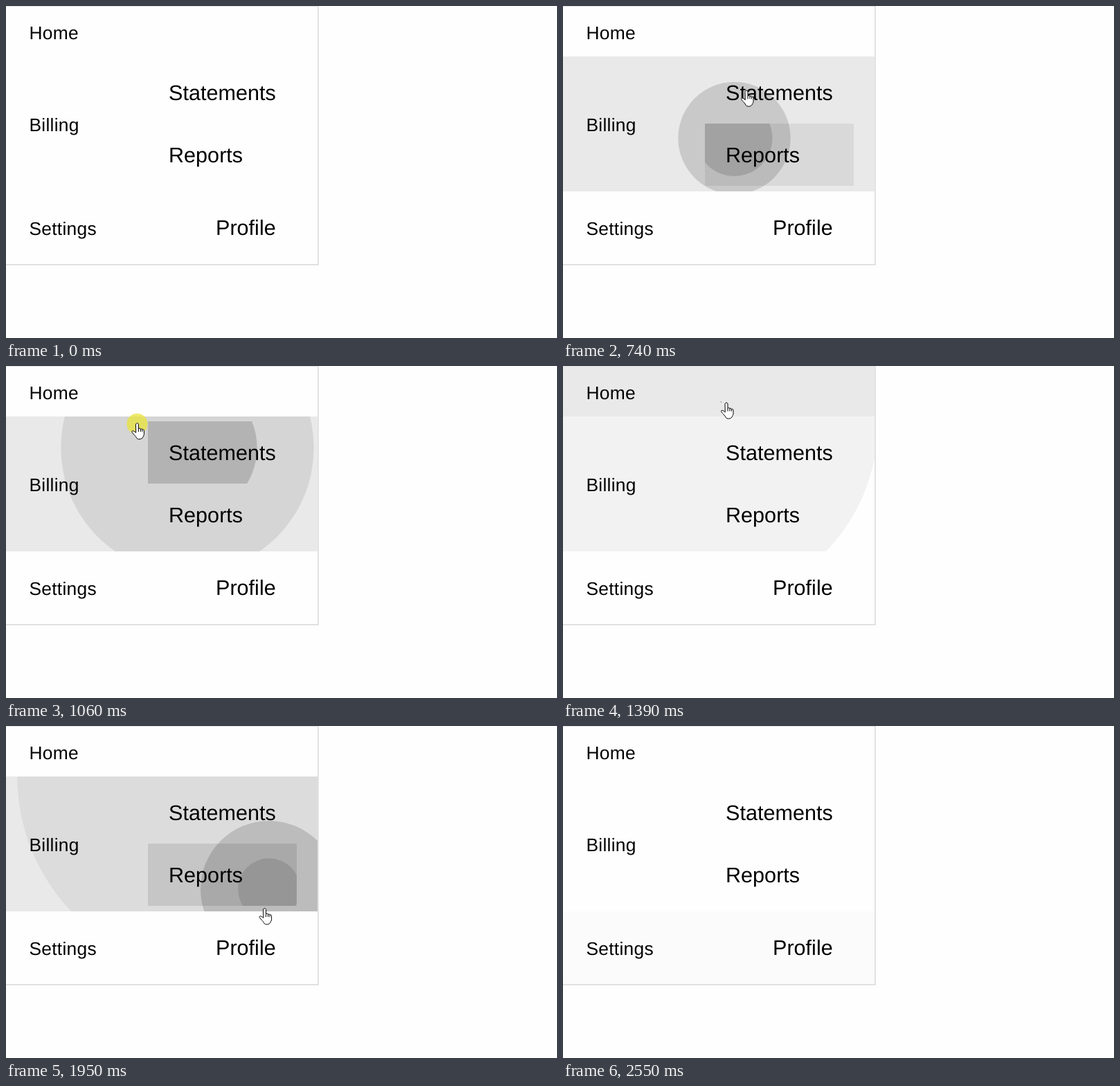
An HTML page for the animation above (3.97 s loop, 796 px wide and 480 px high).

```html
<!DOCTYPE html>
<html lang="en">
<head>
<meta charset="utf-8">
<title>Menu ripples</title>
<style>
  html, body { margin: 0; width: 100%; height: 100%; overflow: hidden; background: #fefefe; }
  svg { display: block; width: 796px; height: 480px; }
  text { font-family: "Liberation Sans", Arial, sans-serif; text-rendering: geometricPrecision; }
  .item { font-size: 26.4px; letter-spacing: .25px; }
  .button { font-size: 30.6px; }
  .line { fill: #e2e2e2; }
  #hand path { fill: #fff; stroke: #000; stroke-linejoin: round; stroke-linecap: round; }
</style>
</head>
<body>
<svg viewBox="0 0 796 480">
  <defs id="defs"></defs>
  <g class="line">
    <rect width="452" height="1"/>
    <rect x="450" width="2" height="375"/>
    <rect y="373" width="452" height="2"/>
  </g>
  <g id="areas"></g>
  <g class="item">
    <text x="33.5" y="48">Home</text>
    <text x="33.5" y="181">Billing</text>
    <text x="33.5" y="331">Settings</text>
  </g>
  <g class="button">
    <text x="235" y="136">Statements</text>
    <text x="235" y="226">Reports</text>
    <text x="303" y="331">Profile</text>
  </g>
  <g id="hand">
    <circle id="press" cy="1" r="15" fill="#e8e337" fill-opacity=".75"/>
    <path d="M-2 2C-2 -.7 2 -.7 2 2V8.5C2.5 7 5 7 5 9C5.5 7.6 7.5 8 7.5 9.8C8 8.6 10 9 10 11V16C10 18 8.5 19 8.5 20C7 24 0 24 -1 21C-1.5 19 -7.5 14 -7.5 12.5C-7.5 10.5 -5 10.5 -2 13.5Z"/>
    <path d="M2 9v3M5 9v3M7.5 10v2"/>
  </g>
</svg>
<script>
const LOOP = 3970, GROW = 385, HOVER = 120, PRESS = 60, STEP = 48;
const $ = id => document.getElementById(id);
const clamp = v => Math.min(1, Math.max(0, v));
const smooth = v => v * v * (3 - 2 * v);

function add(parent, tag, attrs) {
  const el = document.createElementNS("http://www.w3.org/2000/svg", tag);
  for (const k in attrs) el.setAttribute(k, attrs[k]);
  return parent.appendChild(el);
}

// Darkness of hover and of a ripple that has grown to fraction f
const row = { hover: .084, ripple: f => .187 * (1 - .9 * f) };
const button = { hover: .1, ripple: f => .168 * Math.sin(Math.PI * f) };

// box: left, top, right, bottom; spans: pointer enters, leaves
const areas = {
  home: { ...row, box: [0, 1, 450, 73], spans: [[1180, 1600]] },
  billing: { ...row, box: [0, 73, 450, 268], spans: [[150, 1130], [1600, 2070]] },
  settings: { ...row, box: [0, 268, 450, 373], spans: [[2060, 2445]] },
  statements: { ...button, box: [205, 80, 420, 170], spans: [[760, 930], [1585, 1705]] },
  reports: { ...button, box: [205, 170, 420, 260], spans: [[200, 705], [1750, 2050]] },
  profile: { ...button, box: [273, 275, 420, 365], spans: [[2060, 2240]] }
};

const clicks = [
  { time: 626, x: 247.5, y: 191, hits: ["billing", "reports"] },
  { time: 827, x: 262, y: 118, hits: ["billing", "statements"] },
  { time: 1070, x: 189, y: 83, hits: ["billing"] },
  { time: 1388, x: 228.5, y: 52, hits: ["home"] },
  { time: 1636, x: 299.5, y: 73, hits: ["billing"] },
  { time: 1849, x: 380, y: 236, hits: ["billing", "reports"] },
  { time: 2120, x: 365, y: 301, hits: ["settings", "profile"] }
];

// The pointer visits every click, with a few stops between
const route = [
  ...clicks.map(c => [c.time - PRESS / 2, c.x, c.y]),
  [130, 262, 328], [320, 247, 200], [490, 247, 200], [740, 265, 122],
  [1390, 236, 53], [1750, 367, 227], [2180, 427, 332], [2550, 547, 484]
].sort((a, b) => a[0] - b[0]);

// Times the screen refreshes are evenly spread between
const beats = [130, 490, 740, 1060, 1390, 1750, 2180, 2550];

for (const name in areas) {
  const a = areas[name], [l, t, r, b] = a.box;
  const rect = { x: l, y: t, width: r - l, height: b - t };
  add(add($("defs"), "clipPath", { id: name }), "rect", rect);
  a.fill = add($("areas"), "rect", rect);
  a.layer = add($("areas"), "g", { "clip-path": `url(#${name})` });
}

const ripples = clicks.flatMap(({ time, x, y, hits }) => hits.map(name => {
  const { box: [l, t, r, b], layer, ripple } = areas[name];
  const reach = Math.hypot(Math.max(x - l, r - x), Math.max(y - t, b - y));
  return { time, reach, ripple, el: add(layer, "circle", { cx: x, cy: y }) };
}));

function snap(t) {
  const i = beats.findIndex(b => t < b);
  if (i === 0) return t;
  if (i < 0) return beats[beats.length - 1];
  const a = beats[i - 1], gap = beats[i] - a;
  const step = gap / Math.round(gap / STEP);
  return a + Math.floor((t - a) / step + 1e-6) * step;
}

function pointer(t) {
  const i = route.findIndex(p => t < p[0]);
  if (i < 1) return route[i < 0 ? route.length - 1 : 0].slice(1);
  const [t0, x0, y0] = route[i - 1], [t1, x1, y1] = route[i];
  const f = smooth((t - t0) / (t1 - t0));
  return [x0 + (x1 - x0) * f, y0 + (y1 - y0) * f];
}

function draw(t) {
  for (const { fill, hover, spans } of Object.values(areas)) {
    const level = spans.reduce((sum, [on, off]) =>
      sum + clamp((t - on) / HOVER) - clamp((t - off) / HOVER), 0);
    fill.setAttribute("fill-opacity", hover * level);
  }
  for (const { time, reach, ripple, el } of ripples) {
    const f = (t - time) / GROW, on = f > 0 && f < 1;
    el.setAttribute("r", on ? reach * f : 0);
    el.setAttribute("fill-opacity", on ? ripple(f) : 0);
  }
  const pressed = clicks.some(c => t >= c.time - PRESS && t < c.time);
  $("hand").setAttribute("transform", `translate(${pointer(t)})`);
  $("hand").style.display = t < beats[0] ? "none" : "";
  $("press").style.display = pressed ? "" : "none";
}

const begin = performance.now();
function tick() {
  draw(snap((performance.now() - begin) % LOOP));
  requestAnimationFrame(tick);
}
tick();
</script>
</body>
</html>
```
